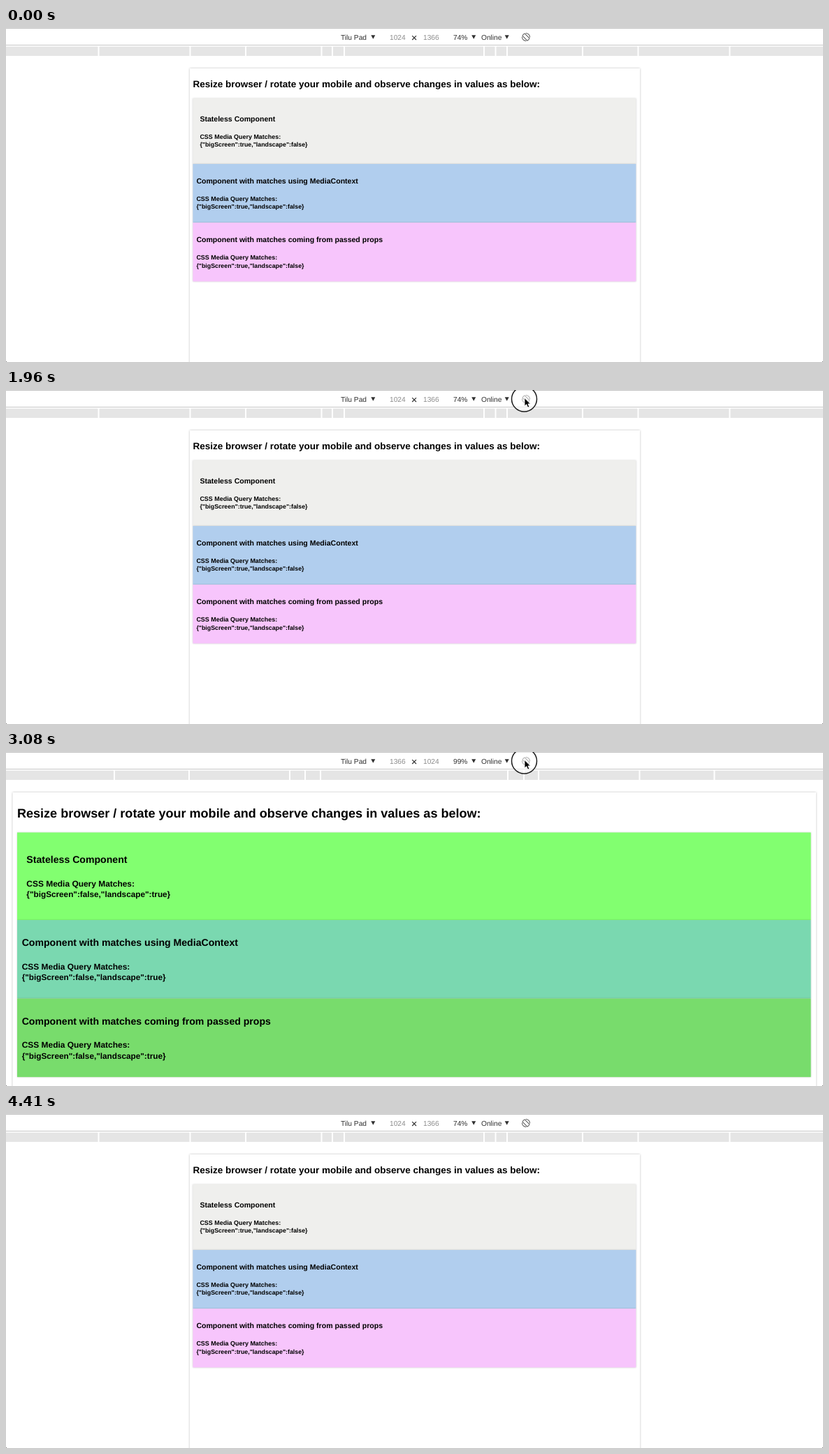
Recreate the animation shown at these times as an HTML page. Size 1169x479 px, loop 4480 ms.

```html
<!DOCTYPE html>
<html lang="en">
<head>
<meta charset="utf-8">
<title>Media query demo</title>
<style>
  html, body { margin: 0; width: 100%; height: 100%; overflow: hidden; background: #fff; }
  svg { display: block; font-family: "Liberation Sans", Arial, sans-serif; text-rendering: geometricPrecision; }
  .bar { font-size: 10.2px; fill: #303030; }
  .bar .dim { fill: #8c8c8c; }
  .content { font-weight: bold; fill: #000; }
  .page { fill: #fff; filter: drop-shadow(0 0 1.5px #bbb); }
  .block { filter: drop-shadow(0 .6px .8px #0003); }
</style>
</head>
<body>
<svg id="stage" width="1169" height="479" viewBox="0 0 1169 479">
  <rect width="1169" height="479" fill="#fff"/>
  <g id="device"></g>
  <g class="bar">
    <rect width="1169" height="1" fill="#c4c4c4"/>
    <rect y="24" width="1169" height="1" fill="#c8c8c8"/>
    <text x="479" y="16.5">Tilu Pad</text>
    <text id="wide" class="dim" x="549" y="16.5"></text>
    <path d="M581.2 11.2l5.8 5.8m0-5.8l-5.8 5.8" stroke="#333" stroke-width="1.2"/>
    <text id="high" class="dim" x="597" y="16.5"></text>
    <text id="zoom" x="640" y="16.5"></text>
    <text x="680" y="16.5">Online</text>
    <path d="M522.3 10.2h6l-3 5.6zM666.2 10.2h6l-3 5.6zM713.7 10.2h6l-3 5.6z"/>
    <g transform="translate(744 13) rotate(45)" fill="none" stroke="#555">
      <rect x="-5.2" y="-2.3" width="10.4" height="4.6" rx="1"/>
      <path d="M-4.2-3.6A5.6 5.6 0 0 1 4.2-3.6M4.2 3.6A5.6 5.6 0 0 1-4.2 3.6"/>
    </g>
  </g>
  <g id="ruler"></g>
  <path d="M0 478h1v1h-1zM1168 478h1v1h-1z" fill="#777"/>
  <circle id="ring" cx="741.5" cy="13" r="18" fill="#fff" fill-opacity=".5" stroke="#1c1c1c" stroke-width="1.5"/>
  <g id="cursor">
    <path id="arrow" d="M0 0V11.6L2.7 9.1L4.7 13.6L6.8 12.7L4.9 8.4H8.4Z" fill="#000" stroke="#fff" stroke-width=".8"/>
    <path id="hand" d="M-2 1Q-1.5-1 0 .5L2 5Q3-.2 4 5Q5 3.5 6 5.5Q8 5 7.5 8L6.5 13.5H0L-4 8.5Q-4.5 6.5-2.5 7.2L-.7 8.4Z"
      fill="#fff" stroke="#222" stroke-width="1.1" stroke-linejoin="round"/>
  </g>
</svg>
<script>
const LOOP = 4480, STEP = 70, LANDSCAPE_SCALE = 1.336;
const $ = id => document.getElementById(id);

function add(parent, tag, attrs, text) {
  const node = document.createElementNS("http://www.w3.org/2000/svg", tag);
  for (const key in attrs) node.setAttribute(key, attrs[key]);
  if (text) node.textContent = text;
  parent.append(node);
  return node;
}

function addContent(parent, x, scale, width, colors, matches) {
  const group = add(parent, "g", {
    class: "content", transform: `translate(${x} 58) scale(${scale})`
  });
  const label = (dx, y, size, text) => add(group, "text", { x: dx, y, "font-size": size }, text);
  label(0, 27, 13.5, "Resize browser / rotate your mobile and observe changes in values as below:");
  const blocks = [
    [43, 94, 10, 32.5, "Stateless Component"],
    [137, 84.2, 5, 27.5, "Component with matches using MediaContext"],
    [221.2, 84.3, 5, 27.7, "Component with matches coming from passed props"]
  ];
  blocks.forEach(([y, height, inset, base, title], i) => {
    add(group, "rect", { class: "block", y, width, height, fill: colors[i] });
    label(inset, y + base, 10.55, title);
    label(inset, y + base + 25.3, 8.95, "CSS Media Query Matches:");
    label(inset, y + base + 36.9, 8.8, JSON.stringify(matches));
  });
}

function addScene(frameX, frameWidth, ...content) {
  const scene = add($("device"), "g", {});
  add(scene, "rect", { class: "page", x: frameX, y: 58, width: frameWidth, height: 440 });
  addContent(scene, ...content);
  return scene;
}

function addRuler(gaps) {
  const group = add($("ruler"), "g", {});
  add(group, "rect", { y: 26.5, width: 1169, height: 13.5, fill: "#e5e5e5" });
  for (const x of gaps) add(group, "rect", { x: x - 1, y: 26, width: 2, height: 14, fill: "#fff" });
  return group;
}

const tall = [634, ["#efefed", "#b1ceee", "#f7c5fc"], { bigScreen: true, landscape: false }];
const flat = [850, ["#82ff70", "#7ad8b0", "#78dc6c"], { bigScreen: false, landscape: true }];
const scenes = {
  portrait: addScene(263, 644, 267.4, 1, ...tall),
  turning: addScene(9.5, 1149.5, 14.3, 1, ...tall),
  landscape: addScene(9.5, 1149.5, 16, LANDSCAPE_SCALE, ...flat),
  returning: addScene(9.5, 1149.5, 267.4, 1, ...tall)
};
const rulers = [
  addRuler([132.5, 263.5, 343, 451.5, 467, 484, 684, 700.5, 717, 825, 904.5, 1035.5]),
  addRuler([155, 262, 406, 428, 450, 718, 741, 762, 906.5, 1013.5])
];

const sceneSteps = [
  [0, "portrait"], [2100, "turning"], [2170, "landscape"], [3150, "returning"], [3220, "portrait"]
];
const cursorPath = [
  [980, 700, 230], [1120, 722, 80], [1260, 730, 29], [1540, 742, 11.5],
  [3430, 742, 11.5], [3780, 1150, 365]
];

const show = (node, on) => node.setAttribute("visibility", on ? "visible" : "hidden");
const between = (t, from, to) => t >= from && t < to;

function drawCursor(t) {
  const next = cursorPath.findIndex(point => point[0] > t);
  const visible = next > 0;
  show($("arrow"), false);
  show($("hand"), false);
  if (!visible) return;
  const [t0, x0, y0] = cursorPath[next - 1], [t1, x1, y1] = cursorPath[next];
  const p = (t - t0) / (t1 - t0), eased = t0 < 3430 ? p : p * p;
  const x = x0 + (x1 - x0) * eased, y = y0 + (y1 - y0) * eased;
  const overRuler = between(y, 25, 41);
  show($(overRuler ? "hand" : "arrow"), true);
  $("cursor").setAttribute("transform", `translate(${x} ${y})`);
}

function draw(now) {
  const t = Math.floor((now % LOOP) / STEP) * STEP;
  const current = sceneSteps.filter(([start]) => start <= t).pop()[1];
  for (const name in scenes) show(scenes[name], name === current);
  const rotated = current !== "portrait";
  rulers.forEach((ruler, i) => show(ruler, i === Number(rotated)));
  $("wide").textContent = rotated ? "1366" : "1024";
  $("high").textContent = rotated ? "1024" : "1366";
  $("zoom").textContent = rotated ? "99%" : "74%";
  show($("ring"), between(t, 1960, 2100) || between(t, 3010, 3150));
  drawCursor(t);
}

const start = performance.now();
function tick() {
  draw(performance.now() - start);
  requestAnimationFrame(tick);
}
tick();
</script>
</body>
</html>
```
